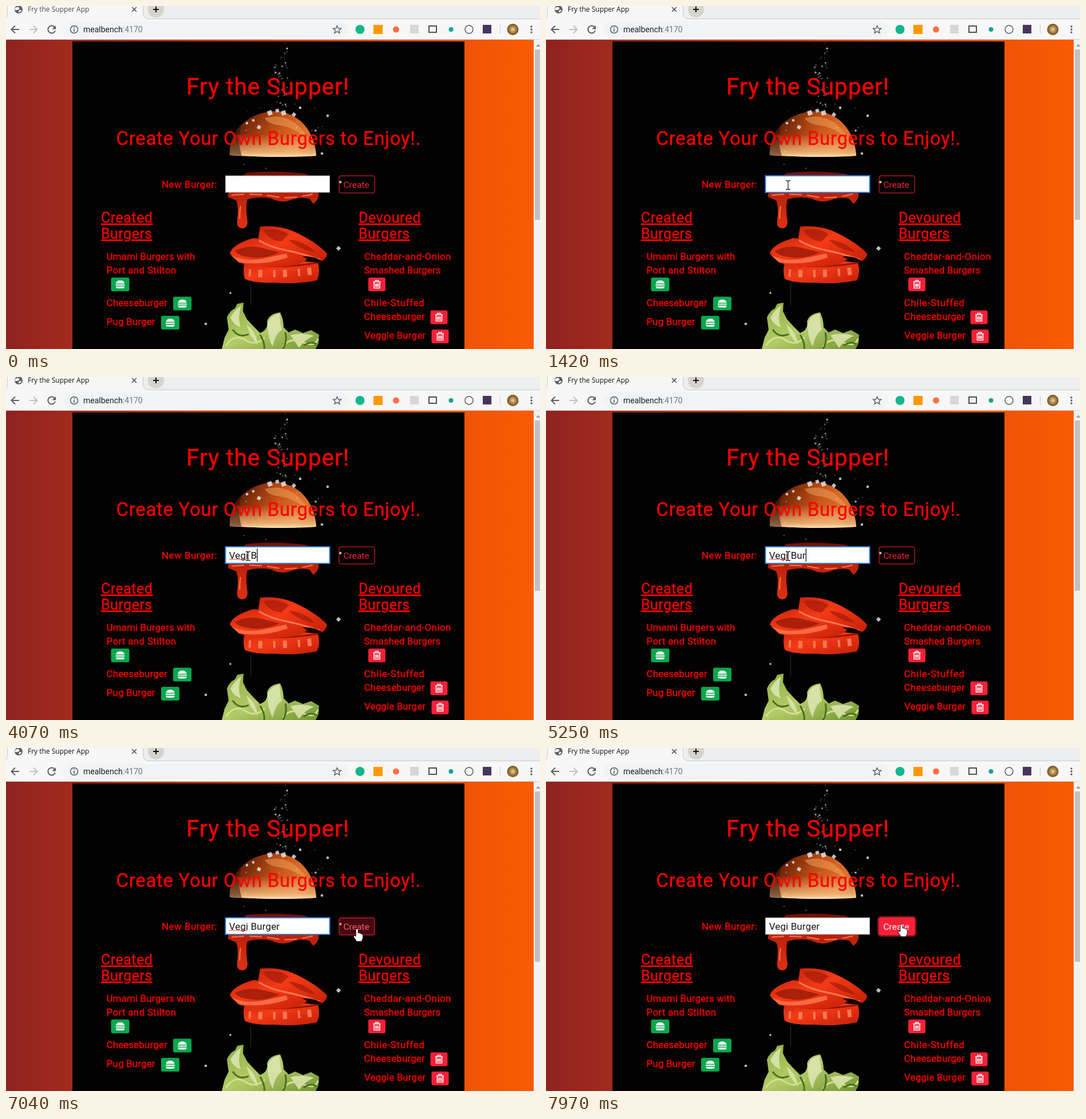
An HTML page for the animation above (8000 ms loop, 933 px wide and 600 px high).

```html
<!DOCTYPE html>
<html lang="en">
<head>
<meta charset="utf-8">
<title>Fry the Supper</title>
<style>
html, body { margin: 0; width: 100%; height: 100%; overflow: hidden; background: #000; }
svg { display: block; width: 933px; height: 600px; }
text { white-space: pre; font-family: Roboto, "Open Sans", sans-serif; }
.red { fill: #f00; stroke: #f00; stroke-width: .3; }
.head { font-size: 25px; letter-spacing: .5px; text-decoration: underline; text-decoration-thickness: 2px; }
.line { fill: none; stroke: #5a5e62; stroke-width: 2; }
</style>
</head>
<body>
<svg id="stage" viewBox="0 0 933 600" xmlns="http://www.w3.org/2000/svg">
  <defs>
    <linearGradient id="page">
      <stop offset="0" stop-color="#902220"/><stop offset=".12" stop-color="#a02a1d"/>
      <stop offset=".87" stop-color="#ef5406"/><stop offset="1" stop-color="#fc5c00"/>
    </linearGradient>
    <linearGradient id="bun" x1="0" y1=".35" x2="1" y2=".65">
      <stop offset="0" stop-color="#4e1806"/><stop offset=".25" stop-color="#8a330c"/>
      <stop offset=".55" stop-color="#c9561a"/><stop offset=".85" stop-color="#e0752e"/><stop offset="1" stop-color="#b65218"/>
    </linearGradient>
    <linearGradient id="bunBase" x2="0" y2="1">
      <stop offset=".5" stop-color="#f3c183" stop-opacity="0"/><stop offset=".9" stop-color="#f3c183" stop-opacity=".8"/>
      <stop offset="1" stop-color="#ffe3b4"/>
    </linearGradient>
    <linearGradient id="sauce" x2="0" y2="1">
      <stop offset="0" stop-color="#6a1006"/><stop offset=".35" stop-color="#b8200c"/><stop offset="1" stop-color="#dd3214"/>
    </linearGradient>
    <linearGradient id="tomato" x2="1" y2="1">
      <stop offset="0" stop-color="#c8260c"/><stop offset=".4" stop-color="#f43a16"/><stop offset="1" stop-color="#c41f08"/>
    </linearGradient>
    <linearGradient id="leaf" x2="1" y2="1">
      <stop offset="0" stop-color="#8fae40"/><stop offset=".5" stop-color="#b3cb68"/><stop offset="1" stop-color="#6f9431"/>
    </linearGradient>
    <radialGradient id="face">
      <stop offset="0" stop-color="#e9d3a0"/><stop offset=".6" stop-color="#a67c3c"/><stop offset="1" stop-color="#6b4b25"/>
    </radialGradient>
    <path id="dome" d="M391 261C389 216 426 185 470 184C514 186 540 222 542 262Q518 264 466 264Q420 263 391 261Z"/>
    <g id="eat">
      <rect width="32" height="24" rx="3" fill="#08a64d"/>
      <path fill="#fff" d="M8.500 10.500Q9 5 16 5T23.500 10.500ZM8 12H24V14H8ZM8.500 15.500H23.500Q23.500 19 20.500 19H11.500Q8.500 19 8.500 15.500Z"/>
    </g>
    <g id="bin">
      <rect width="30" height="24" rx="3" fill="#f82038"/>
      <path fill="none" stroke="#fff" stroke-width="1.600" d="M8.500 7.500H21.500M12.500 7V5H17.500V7M10 8V18.500H20V8M12.700 10.500V16.500M15 10.500V16.500M17.300 10.500V16.500"/>
    </g>
  </defs>

  <rect width="933" height="600" fill="url(#page)"/>
  <rect x="116" y="62" width="685" height="538" fill="#030202"/>

  <g id="food">
    <use href="#dome" fill="url(#bun)"/>
    <use href="#dome" fill="url(#bunBase)"/>
    <path fill="#f2a35c" opacity=".5" d="M452 196Q478 188 503 203Q521 216 530 236Q508 214 480 209Q458 207 452 196Z"/>
    <path fill="#2c0c03" opacity=".5" d="M391 261Q390 225 413 203Q402 232 412 262Z"/>
    <path fill="url(#sauce)" d="M420 292Q470 286 526 294L546 326Q548 338 537 346L530 337Q512 333 496 340Q480 345 464 337Q444 332 422 338Q418 350 422 377Q422 389 412 389Q402 388 404 374Q407 350 402 340L388 334Q386 318 420 292Z"/>
    <path fill="none" stroke="#ff7a4c" stroke-width="2.500" stroke-dasharray="22 9" opacity=".8" d="M394 331Q440 327 468 333T536 329M410 350Q407 366 409 378"/>
    <path fill="url(#tomato)" d="M417 448Q470 440 545 449Q550 467 543 480Q510 487 470 484Q430 485 417 477Q413 462 417 448Z"/>
    <path fill="none" stroke="#ff8f68" stroke-width="13" stroke-dasharray="4 13 7 19" opacity=".75" d="M424 467Q478 471 540 463"/>
    <path fill="none" stroke="#7d1004" stroke-width="3" opacity=".8" d="M414 449Q470 462 546 449"/>
    <path fill="url(#tomato)" d="M391 433Q395 417 432 406L478 411Q525 420 529 437Q526 451 493 455Q445 460 407 449Z"/>
    <path fill="#8d1607" opacity=".7" d="M400 429Q420 417 447 423L478 431Q450 444 424 439Q408 438 400 429Z"/>
    <path fill="#ff7850" opacity=".8" d="M393 436Q420 449 453 441L490 433L492 440Q450 455 407 448Z"/>
    <path fill="url(#tomato)" d="M444 386Q476 383 502 394Q541 412 561 433Q561 442 549 448Q510 437 480 429Q455 423 440 411Z"/>
    <path fill="#a21a08" opacity=".65" d="M450 392Q476 387 494 399L481 412Q459 410 450 392ZM494 409Q520 410 541 431Q511 426 494 409Z"/>
    <path fill="none" stroke="#ff8a62" stroke-width="3" opacity=".8" d="M442 410Q462 422 488 427T549 444"/>
    <path fill="#170302" d="M518 438Q538 436 555 448L532 446Z"/>
    <path fill="url(#leaf)" d="M377 600L382 580L389 566L386 545Q391 533 400 529L404 521L415 519L414 534L421 548L432 560L444 572Q459 566 456 552Q460 538 479 536Q485 549 485 562L494 571L505 566L519 572L533 567L547 575L546 590L541 600Z"/>
    <path fill="#dfe7b4" opacity=".85" d="M457 557Q461 541 478 538Q478 552 482 566Q470 574 466 596Q457 580 457 557ZM392 545Q400 531 411 524Q404 546 410 562Q397 558 392 545ZM420 557Q437 570 440 592Q427 580 420 557ZM497 576Q516 570 538 577Q521 584 512 598Z"/>
    <path fill="none" stroke="#d4e08e" stroke-width="3" d="M384 594Q400 572 418 584T452 580M484 596Q496 578 518 588T545 582"/>
    <path fill="none" stroke="#4b6d20" stroke-width="3" d="M396 566Q407 582 424 574M444 575Q453 590 451 600M488 571Q492 586 484 600M520 594Q533 585 543 592"/>
    <path stroke="#777" d="M427.500 486V523" opacity=".4"/>
    <g id="salt"></g>
  </g>

  <g class="red" id="copy">
    <text x="315" y="155" font-size="41" letter-spacing=".8">Fry the Supper!</text>
    <text x="192.500" y="243" font-size="33" letter-spacing=".68">Create Your Own Burgers to Enjoy!.</text>
    <text x="272" y="318" font-size="17" letter-spacing=".45">New Burger:</text>
    <text class="head" x="166" y="378.500">Created</text>
    <text class="head" x="166" y="406.500">Burgers</text>
    <text class="head" x="616" y="378.500">Devoured</text>
    <text class="head" x="616" y="406.500">Burgers</text>
  </g>
  <use href="#eat" x="183.500" y="475"/><use href="#eat" x="292" y="508.500"/><use href="#eat" x="271" y="542"/>
  <use href="#bin" x="633" y="475"/><use href="#bin" x="741.500" y="532.500"/><use href="#bin" x="743.500" y="566"/>

  <rect id="box" x="383.500" y="297" width="182" height="29" fill="#fff"/>
  <text id="typed" x="389.800" y="318" font-size="17" letter-spacing=".1" fill="#161616"></text>
  <path id="wave" fill="none" stroke="#e33" stroke-width="1"/>
  <rect id="caret" y="300" width="1.200" height="23" fill="#000"/>

  <rect id="ring" x="580.500" y="295.500" width="65" height="33" rx="5" fill="none" stroke="#7e1420" stroke-width="3"/>
  <rect id="btn" x="582" y="297" width="62" height="30" rx="3" stroke="#f82038"/>
  <text id="btnText" x="589.500" y="317.500" font-size="15.500">Create</text>

  <rect width="933" height="59" fill="#f6f7f6"/>
  <path d="M0 58.500H933" stroke="#d2d2d2"/>
  <path fill="#eceef0" d="M240 0H933V22H249Q240 22 240 13Z"/>
  <path d="M2.500 0V12Q2 20 0 21M239.500 0V13Q240 22 249 22.500H933" fill="none" stroke="#c6c9cc"/>
  <circle cx="22" cy="6" r="7" fill="#5c6064"/>
  <path d="M17 3Q21 0 23 3T19 7T17 3M22 9Q24 6 27 7Q26 11 22 11Z" fill="#fff"/>
  <text id="tab" x="38" y="10" font-size="12" style="font-family:'Open Sans',sans-serif">Fry the Supper App</text>
  <path d="M220 2L228 10M228 2L220 10" stroke="#45494d" stroke-width="1.500"/>
  <circle cx="262" cy="6" r="14" fill="#d5d4cd"/>
  <path d="M257 6H267M262 1V11" stroke="#111" stroke-width="2"/>
  <path class="line" d="M23 41H10M16 34.500L9.500 41L16 47.500"/>
  <path class="line" style="stroke:#bfc1c3" d="M41 41H54M48 34.500L54.500 41L48 47.500"/>
  <path class="line" d="M85 37A6.500 6.500 0 1 0 86 43"/>
  <path d="M87 34V40.500H80.500Z" fill="#5a5e62"/>
  <rect x="101" y="27" width="497" height="28" rx="14" fill="#f1f3f4"/>
  <circle class="line" style="stroke-width:1.500" cx="119" cy="41" r="6.500"/>
  <path class="line" d="M119 40V45M119 36.500V38.500" style="stroke-width:1.600"/>
  <text x="135" y="46" font-size="14" fill="#202124">mealbench<tspan fill="#74787c">:4170</tspan></text>
  <path class="line" style="stroke-width:1.400" d="M578.500 34.500L580.500 39L585.500 39.300L581.700 42.500L583 47.300L578.500 44.600L574 47.300L575.300 42.500L571.500 39.300L576.500 39Z"/>
  <g id="tools">
    <circle cx="618.500" cy="41" r="8" fill="#12b78c"/>
    <rect x="642" y="33" width="16" height="16" fill="#ff9800"/>
    <circle cx="681.500" cy="41" r="5.500" fill="#ff7043"/>
    <rect x="706" y="33" width="15" height="15" fill="#d5d7d8"/>
    <rect x="739" y="35" width="13" height="11" fill="none" stroke="#465350" stroke-width="2"/>
    <circle cx="777.500" cy="41" r="4" fill="#15a393"/>
    <circle cx="809" cy="41" r="7" fill="none" stroke="#5a5c5f" stroke-width="1.500"/>
    <rect x="833" y="33" width="15" height="15" fill="#46345c"/>
  </g>
  <path d="M863.500 33V49" stroke="#c9cbcd"/>
  <circle cx="885.500" cy="41" r="10" fill="url(#face)"/>
  <g fill="#5a5e62"><circle cx="918" cy="36" r="1.700"/><circle cx="918" cy="41" r="1.700"/><circle cx="918" cy="46" r="1.700"/></g>

  <rect x="922" y="59" width="11" height="541" fill="#f1f1f1"/>
  <rect x="924" y="76" width="9" height="298" fill="#c1c1c1"/>
  <path d="M926 71L930 66.500L934 71Z" fill="#a0a0a0"/>

  <circle id="press" r="11.500" fill="#fbf45c" opacity=".92"/>
  <g id="mouse">
    <path id="arrow" fill="#fff" stroke="#000" d="M0 0V16L4 12.500L6.500 18.500L9 17.500L6.500 11.500H12Z"/>
    <path id="beam" fill="none" stroke="#222" stroke-width="1.300" d="M-4 -7.500H-1.500L0 -6.500L1.500 -7.500H4M0 -6.500V7M-4 8H-1.500L0 7L1.500 8H4"/>
    <path id="hand" fill="#fff" stroke="#111" d="M-2 1.500Q-2 0 0 0T2 1.500V7Q5 6.500 5.500 8Q8 7.500 8.500 9.500Q10.500 9 10.500 11V15Q10 18 8 22H-1Q-2 19 -6 14Q-6 11 -2 13Z"/>
  </g>
</svg>
<script>
const LOOP = 8000;
const $ = id => document.getElementById(id);
const set = (id, attrs) => { for (const k in attrs) $(id).setAttribute(k, attrs[k]); };
const show = (id, on) => set(id, { visibility: on ? 'visible' : 'hidden' });

// list entries: text, x, baseline, letter spacing
[
  ['Umami Burgers with', 175.5, 444, .1], ['Port and Stilton', 175.5, 468, .3],
  ['Cheeseburger', 175.5, 525, .1], ['Pug Burger', 175.5, 558, .15],
  ['Cheddar-and-Onion', 625.5, 444, .4], ['Smashed Burgers', 625.5, 468, 0],
  ['Chile-Stuffed', 625.5, 525, .65], ['Cheeseburger', 625.5, 549, .1], ['Veggie Burger', 626, 582, .1]
].forEach(([s, x, y, gap]) => {
  $('copy').innerHTML += `<text x="${x}" y="${y}" font-size="17" letter-spacing="${gap}">${s}</text>`;
});

// falling salt
let seed = 11;
const rnd = () => (seed = seed * 16807 % 2147483647) / 2147483647;
const grain = (x, y, r, a) =>
  `<rect x="${-r}" y="${-r}" width="${2 * r}" height="${2 * r}" fill="#eee" opacity="${a}" transform="translate(${x} ${y}) rotate(${rnd() * 90})"/>`;
let salt = '';
for (let i = 0; i < 45; i++) salt += grain(481 + (rnd() - .5) * 24, 63 + rnd() * 115, .5 + rnd(), .2 + rnd() * .55);
for (let i = 0; i < 30; i++) salt += grain(400 + rnd() * 165, 170 + rnd() * 115, .4 + rnd() * .7, .15 + rnd() * .4);
[[461, 187, 4], [474, 183, 3], [485, 187, 4], [503, 190, 3], [442, 212, 3], [421, 205, 2], [432, 200, 2], [514, 178, 2],
 [562, 192, 2], [552, 258, 2], [541, 218, 1.5], [581, 424, 3], [349, 556, 2], [392, 502, 1.5], [584, 308, 2]]
  .forEach(([x, y, r]) => { salt += grain(x, y, r, .8); });
$('salt').innerHTML = salt;

let wave = 'M390 320';
for (let x = 392; x <= 423; x += 2) wave += `L${x} ${x % 4 ? 320 : 318}`;
set('wave', { d: wave });

const word = 'Vegi Burger';
const keys = [2070, 2440, 2750, 2980, 3220, 4070, 5010, 5250, 5720, 5970, 6040];
const caretOff = [[1420, 1900], [3770, 4070], [4640, 5010], [6580, 7100]];
const FOCUS = 910, CLICK = 7690;
const path = [[70, 681, 557], [340, 441, 333], [480, 441, 333], [740, 423, 313], [6540, 423, 313],
  [6800, 500, 317], [7130, 655, 316], [7280, 652, 315], [7360, 640, 312], [7440, 622, 308], [7520, 621, 308]];
const hover = [[6970, 0], [7060, .35], [7130, .2], [7220, 0], [7340, 0], [7440, .68], [7520, 1]];

// piecewise linear value, one or more channels
function along(track, t) {
  const n = track.findIndex(k => k[0] > t);
  if (n === 0) return track[0].slice(1);
  if (n < 0) return track[track.length - 1].slice(1);
  const a = track[n - 1], b = track[n], f = (t - a[0]) / (b[0] - a[0]);
  return a.slice(1).map((v, i) => v + (b[i + 1] - v) * f);
}
const inside = (v, [from, to]) => v >= from && v < to;

function draw(t) {
  const focused = inside(t, [FOCUS, CLICK]);
  $('tab').setAttribute('fill', t < FOCUS ? '#484c50' : '#101214');
  set('box', { stroke: focused ? '#3b84d6' : '#a9a9a9', 'stroke-width': focused ? 2 : 1 });

  $('typed').textContent = word.slice(0, keys.filter(k => k <= t).length);
  show('wave', inside(t, [3290, CLICK]));
  show('caret', focused && !caretOff.some(r => inside(t, r)));
  set('caret', { x: 389.8 + (t < keys[0] ? 0 : $('typed').getComputedTextLength()) });

  const [fill] = along(hover, t);
  set('btn', { fill: '#f82038', 'fill-opacity': fill });
  set('btnText', { fill: `rgb(248 ${32 + 223 * fill} ${56 + 199 * fill})` });
  set('ring', { opacity: Math.min(1, Math.max(0, (t - CLICK) / 150)) });

  const [x, y] = along(path, t);
  const overBox = inside(x, [383, 566]) && inside(y, [296, 327]);
  const overBtn = inside(x, [582, 644]) && inside(y, [297, 327]);
  const seen = t >= 70;
  set('mouse', { transform: `translate(${x} ${y})` });
  show('beam', seen && overBox);
  show('hand', seen && overBtn);
  show('arrow', seen && !overBox && !overBtn);
  set('press', { cx: x - 2, cy: y });
  show('press', inside(t, [810, FOCUS]) || inside(t, [CLICK, 7800]));
}

function tick() {
  draw(performance.now() % LOOP);
  requestAnimationFrame(tick);
}
tick();
</script>
</body>
</html>
```
